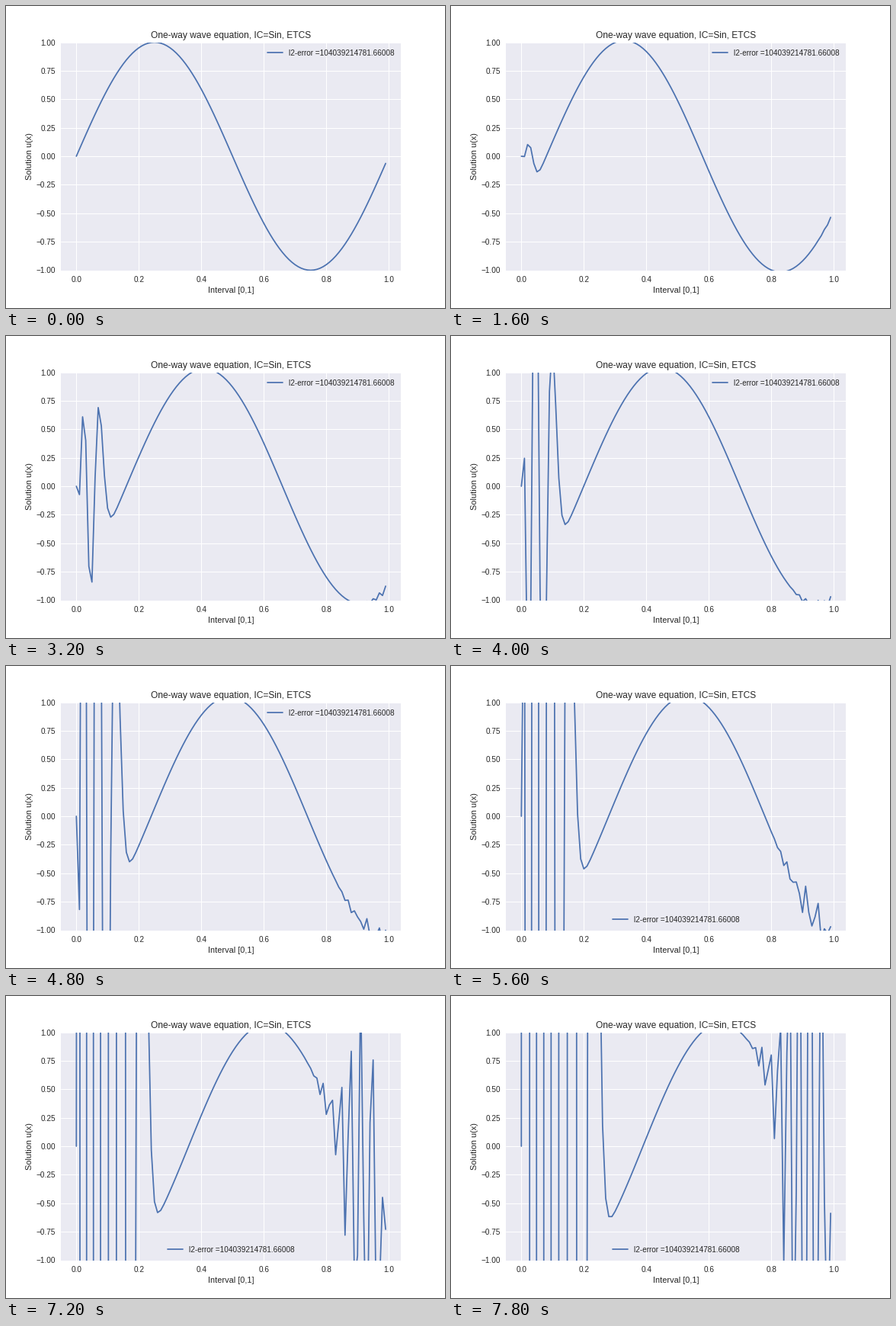
Write a matplotlib script that moves like this. It is 576 px wide and 396 px high and loops after 8 s.

```python
import numpy as np
import matplotlib.pyplot as plt
from matplotlib.animation import FuncAnimation

FRAMES, INTERVAL = 40, 200
N = 100
DX = DT = 1 / N

plt.style.use("seaborn-v0_8")
plt.rcParams.update({
    "font.family": "sans-serif",
    "font.sans-serif": ["Liberation Sans", "DejaVu Sans"],
    "figure.subplot.left": 0.125,
    "figure.subplot.right": 0.9,
    "figure.subplot.bottom": 0.125,
    "figure.subplot.top": 0.88,
})

x = np.arange(N) * DX


def wave(pos, t):
    return np.sin(2 * np.pi * (pos - t))


def solve(steps):
    """Explicit in time, centred in space: unstable, so the ends ring and grow."""
    u = wave(x, 0)
    states = [u]
    for n in range(1, steps):
        new = u.copy()
        new[1:-1] -= DT / (2 * DX) * (u[2:] - u[:-2])
        new[0] = 0
        new[-1] = wave(x[-1], n * DT)
        u = new
        states.append(u)
    return states


states = solve(FRAMES)

fig, ax = plt.subplots(figsize=(8, 5.5), dpi=72)
line, = ax.plot(x, states[0], label="l2-error =104039214781.66008")
ax.set_ylim(-1, 1)
ax.set_yticks(np.linspace(-1, 1, 9))
ax.set_title("One-way wave equation, IC=Sin, ETCS")
ax.set_xlabel("Interval [0,1]")
ax.set_ylabel("Solution u(x)")
ax.legend(loc="best")  # moves to a free spot as the curve travels


def draw(i):
    line.set_ydata(states[i])
    return line,


anim = FuncAnimation(fig, draw, frames=FRAMES, init_func=lambda: draw(0),
                     interval=INTERVAL, repeat=True, repeat_delay=0, blit=False)
plt.show()
```
